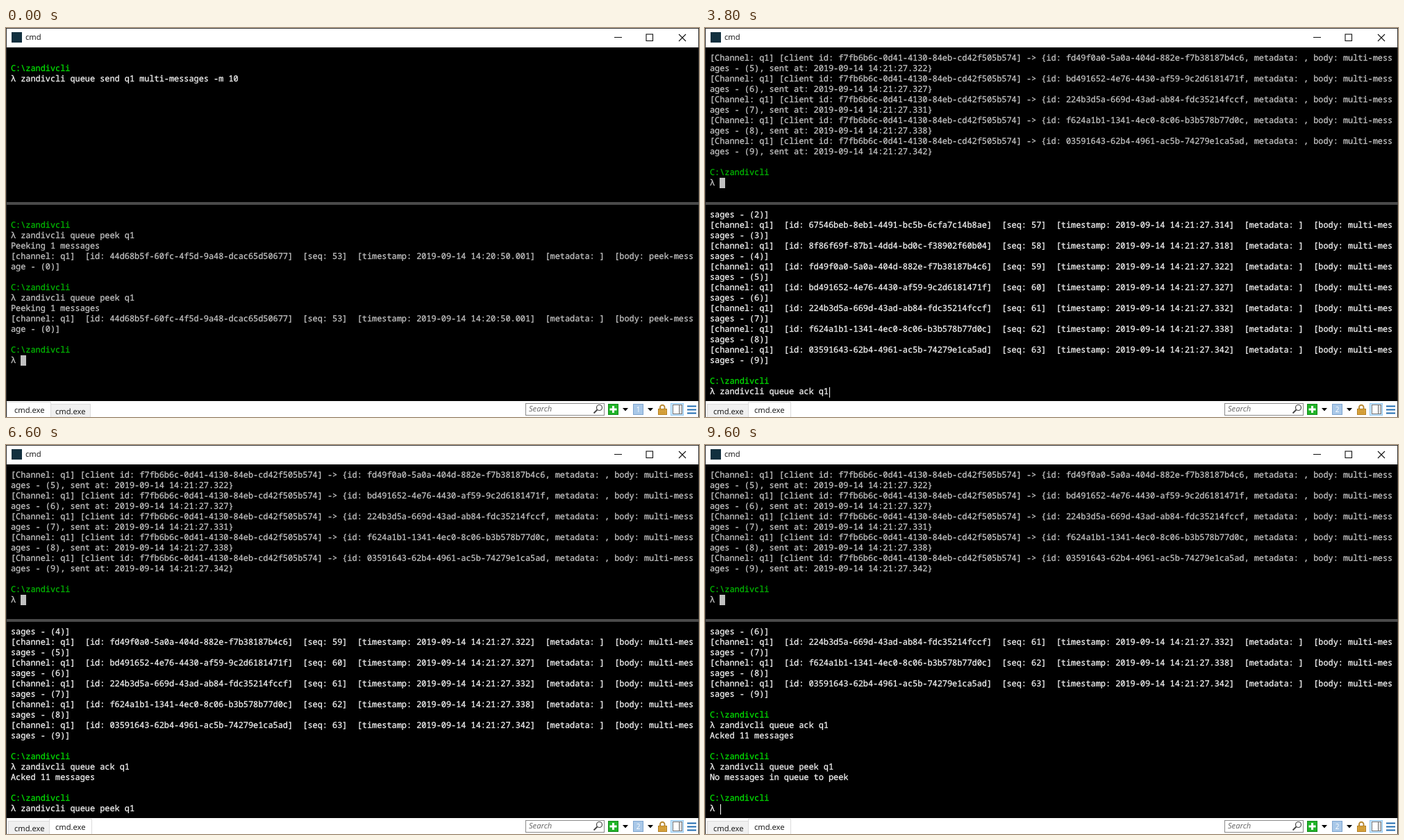
These frames come from a looping animation (998 by 561 pixels, 9800 ms). An HTML page:

```html
<!DOCTYPE html>
<html lang="en">
<head>
<meta charset="utf-8">
<title>Terminal</title>
<style>
  html, body { margin: 0; width: 100%; height: 100%; overflow: hidden; background: #000; }
  #stage { position: absolute; left: 0; top: 0; width: 998px; height: 561px; overflow: hidden; background: #000; }
  #stage > * { position: absolute; }
  svg { left: 0; top: 0; }
  .ui { font: 11.2px/16px "Open Sans", "Noto Sans", sans-serif; color: #111; white-space: pre; text-rendering: geometricPrecision; }
  #title { left: 28px; top: 6px; }
  .pane {
    left: 6.9px; margin: 0; width: 991px; color: #c4c4c4;
    font: 11.89px/15.03px "Noto Sans Mono", "DejaVu Sans Mono", monospace;
    font-variant-ligatures: none; text-rendering: geometricPrecision;
    -webkit-text-stroke: 0.3px currentColor;
  }
  .pane div { height: 15.03px; white-space: pre; }
  .pane .path { color: #00b800; }
  .pane.active { color: #f4f4f4; }
  .pane.active .path { color: #00e000; }
  .pane i { position: absolute; width: 8px; height: 15px; background: #c0c0c0; }
  .pane.active i { width: 1.6px; background: #fff; }
  #top { top: 36px; }
  #bottom { top: 262px; }
  .tab { box-sizing: border-box; top: 542px; height: 20px; padding: 3px 0 0 8px; background: #f0f0f0; border: 1px solid #dcdcdc; border-bottom: 0; }
  .tab.active { top: 539px; height: 23px; padding-top: 4px; background: #fff; z-index: 1; }
</style>
</head>
<body>
<div id="stage">
  <svg width="998" height="561" viewBox="0 0 998 561">
    <path fill="#fff" d="M1 1H997V28H1ZM1 538H997V561H1Z"/>
    <path fill="none" stroke="#333" d="M.5 561V.5H997.5V561"/>
    <path fill="#4a4a4a" d="M1 251H998V255H1Z"/>
    <rect x="8" y="6" width="15" height="15" fill="#12303f"/>
    <g fill="none" stroke="#111" stroke-width="1.1">
      <path d="M876 13.5H887M969 9L979 19M979 9L969 19"/>
      <rect x="922" y="9" width="9.5" height="9.5"/>
    </g>

    <rect x="748.5" y="541.5" width="113" height="17" fill="#fff" stroke="#8a8a8a"/>
    <g fill="none" stroke="#444">
      <circle cx="854.5" cy="547.5" r="4" stroke-width="1.2"/>
      <path d="M851.5 550.5L846.5 555.5" stroke-width="1.8"/>
    </g>
    <rect x="867.5" y="542.5" width="14" height="15" fill="#20b428" stroke="#138a1b"/>
    <path d="M874.5 545V555M869.5 550H879.5" stroke="#fff" stroke-width="3"/>
    <path d="M888 548H896L892 552.5ZM924 548H932L928 552.5Z"/>
    <rect x="903.5" y="542.5" width="14" height="15" fill="#a9c8e8" stroke="#7fa5cf"/>
    <text id="number" x="910.5" y="554" text-anchor="middle" fill="#fff" font-size="10" font-family="Open Sans, sans-serif"></text>
    <path d="M942 550V547A3.2 3.2 0 0 1 948.5 547V550" fill="none" stroke="#b98a34" stroke-width="2"/>
    <rect x="939.5" y="549.5" width="12" height="8" fill="#e0a83c" stroke="#b07d22"/>
    <path d="M941 552H950M941 555H950" stroke="#b98a34"/>
    <rect x="957.5" y="541.5" width="18" height="17" fill="#cce8ff" stroke="#92c9f2"/>
    <rect x="960.5" y="543.5" width="13" height="13" fill="#fff" stroke="#777"/>
    <path d="M969.5 544V556" stroke="#777"/>
    <path d="M970 544H973V556H970Z" fill="#ddd"/>
    <path d="M981 545.5H994M981 550.5H994M981 555.5H994" stroke="#1f6bb0" stroke-width="1.8"/>
  </svg>
  <div class="ui" id="title"></div>
  <div class="ui" style="left:753px;top:542px;font-style:italic;color:#666">Search</div>
  <div class="pane" id="top"></div>
  <div class="pane" id="bottom"></div>
  <div class="ui tab"></div>
  <div class="ui tab"></div>
</div>
<script>
const LOOP = 9800, COLUMNS = 138, ROWS = 18, CHAR = 7.134;
const TOOL = 'zandivcli';
const PATH = 'C:\\' + TOOL;
const CLIENT = 'f7fb6b6c-0d41-4130-84eb-cd42f505b574';

const messages = [
  ['67546beb-8eb1-4491-bc5b-6cfa7c14b8ae', 314],
  ['8f86f69f-87b1-4dd4-bd0c-f38902f60b04', 318],
  ['fd49f0a0-5a0a-404d-882e-f7b38187b4c6', 322],
  ['bd491652-4e76-4430-af59-9c2d6181471f', 327],
  ['224b3d5a-669d-43ad-ab84-fdc35214fccf', 332],
  ['f624a1b1-1341-4ec0-8c06-b3b578b77d0c', 338],
  ['03591643-62b4-4961-ac5b-74279e1ca5ad', 342],
].map(([id, ms], i) => ({ id, ms, index: i + 3 }));

const wrap = text => [text.slice(0, COLUMNS), text.slice(COLUMNS)];
const prompt = (command = '') => ['', PATH, 'λ ' + command];
const queue = rest => prompt(`${TOOL} queue ${rest}`);
const received = (id, seq, time, body) => wrap(
  `[channel: q1]  [id: ${id}]  [seq: ${seq}]  [timestamp: 2019-09-14 ${time}]  [metadata: ]  [body: ${body}]`);
const sent = ({ id, ms, index }) => wrap(
  `[Channel: q1] [client id: ${CLIENT}] -> {id: ${id}, metadata: , body: multi-messages - (${index}), ` +
  `sent at: 2019-09-14 14:21:27.${ms === 332 ? 331 : ms}}`);

const firstPeek = [...queue('peek q1'), 'Peeking 1 messages',
  ...received('44d68b5f-60fc-4f5d-9a48-dcac65d50677', 53, '14:20:50.001', 'peek-message - (0)')];
const listing = ['sages - (2)]', ...messages.flatMap(m =>
  received(m.id, m.index + 54, `14:21:27.${m.ms}`, `multi-messages - (${m.index})`))];
const acking = [...listing, ...queue('ack q1')];
const acked = [...acking, 'Acked 11 messages'];
const peeking = [...acked, ...queue('peek q1')];

// Each scene overrides part of the state that was valid before it.
const scenes = [
  [0, { active: 0, title: 'cmd', tab: 'cmd.exe',
        top: queue('send q1 multi-messages -m 10'),
        bottom: [...firstPeek, ...firstPeek, ...prompt()] }],
  [200, { top: [...messages.slice(2).flatMap(sent), ...prompt()] }],
  [800, { active: 1, bottom: queue('peek q1') }],
  ...[...' -m 11'].map((_, i) =>
    [1000 + i * 200, { bottom: queue('peek q1' + ' -m 11'.slice(0, i + 1)) }]),
  [2200, { bottom: [...listing, ...prompt()] }],
  [3800, { bottom: acking }],
  [4000, { bottom: [...acking, ''], title: `cmd - ${TOOL}  queue ack q1`, tab: TOOL + '.exe' }],
  [5000, { bottom: [...acked, ...prompt()], title: 'cmd' }],
  [5200, { tab: 'cmd.exe' }],
  [6000, { bottom: [...acked, ...queue('peek q1 ')] }],
  [6200, { bottom: peeking }],
  [7400, { bottom: [...peeking, ''], title: `cmd - ${TOOL}  queue peek q1`, tab: TOOL + '.exe' }],
  [8600, { bottom: [...peeking, 'No messages in queue to peek', ...prompt()], title: 'cmd' }],
  [8800, { tab: 'cmd.exe' }],
];

// Times at which the caret hides and shows again.
const caretGaps = [[0, 200], [400, 800], [2400, 2600], [3000, 3200], [3400, 3800],
  [4200, 4600], [4800, 5000], [5400, 5600], [5800, 6000], [6600, 6800], [7000, 7400],
  [7800, 8000], [8200, 8600], [8800, 9000], [9400, 9600]];

const byId = id => document.getElementById(id);
const tabs = document.querySelectorAll('.tab');

function drawPane(pane, lines, active, caret) {
  const visible = lines.slice(-ROWS);
  pane.classList.toggle('active', active);
  pane.replaceChildren(...visible.map(line => {
    const row = document.createElement('div');
    row.textContent = line;
    if (line === PATH) row.className = 'path';
    return row;
  }));
  if (active && !caret) return;
  const cursor = document.createElement('i');
  cursor.style.left = visible.at(-1).length * CHAR + (active ? 0.4 : 0) + 'px';
  cursor.style.top = (visible.length - 1) * 15.03 + 'px';
  pane.append(cursor);
}

function placeTab(tab, text, active, left, width) {
  tab.textContent = text;
  tab.classList.toggle('active', active);
  tab.style.left = left + 'px';
  tab.style.width = width + 'px';
  tab.style.paddingLeft = (tab === tabs[0] ? 11 : 70) - left + 'px';
}

function draw({ active, title, tab, top, bottom }, caret) {
  byId('title').textContent = title;
  byId('number').textContent = active + 1;
  drawPane(byId('top'), top, active === 0, caret);
  drawPane(byId('bottom'), bottom, active === 1, caret);
  placeTab(tabs[0], 'cmd.exe', active === 0, active ? 3 : 1, active ? 60 : 64);
  placeTab(tabs[1], tab, active === 1, active ? 62 : 64, active ? (tab === 'cmd.exe' ? 62 : 95) : 58);
}

let drawn = '';
function tick() {
  const time = performance.now() % LOOP;
  const past = scenes.filter(([start]) => start <= time);
  const caret = !caretGaps.some(([from, to]) => time >= from && time < to);
  const key = past.length + ':' + caret;
  if (key !== drawn) {
    draw(Object.assign({}, ...past.map(([, change]) => change)), caret);
    drawn = key;
  }
  requestAnimationFrame(tick);
}
tick();
</script>
</body>
</html>
```
